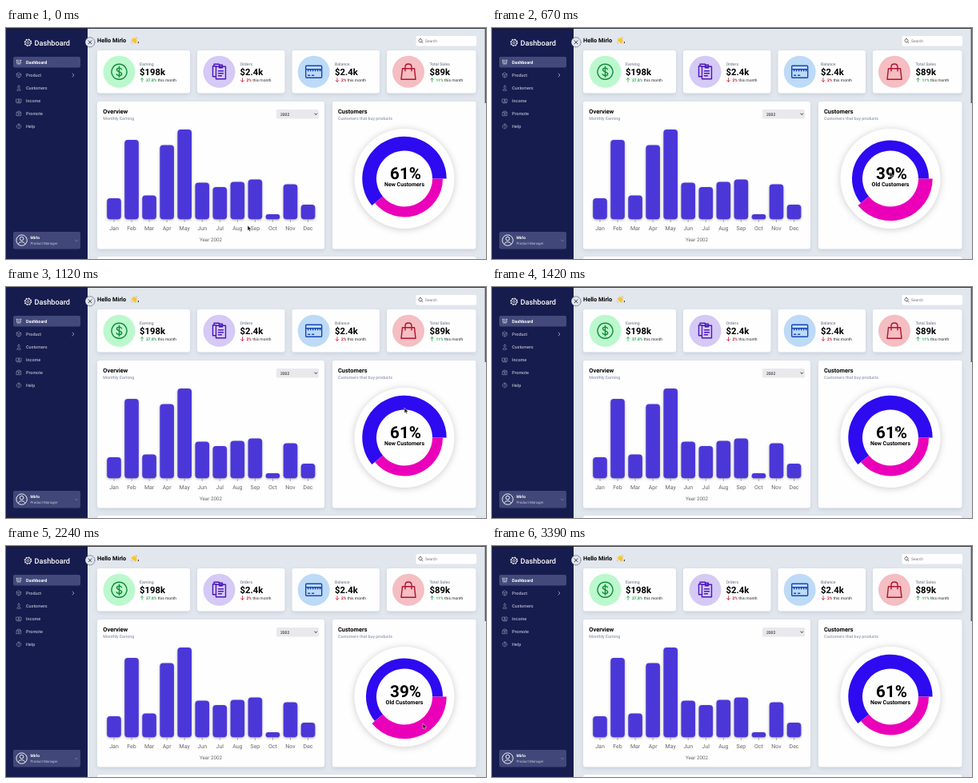
Recreate the animation shown at these times as an HTML page. Size 600 by 289 pixels, loop 3.64 s.

```html
<!DOCTYPE html>
<html lang="en">
<head>
<meta charset="utf-8">
<title>Dashboard</title>
<style>
  html, body { margin: 0; width: 100%; height: 100%; overflow: hidden; background: #e2e7ee; }
  svg { display: block; width: 100vw; height: 100vh; font-family: Roboto, sans-serif; text-rendering: geometricPrecision; }
  .card { fill: #fefefe; filter: drop-shadow(0 2px 2.5px #5666802e); }
  .bar { fill: #4b37d8; filter: drop-shadow(0 1.5px 1.5px #0005); }
  .dial { fill: #fefefe; filter: drop-shadow(0 1px 4px #0003); }
  .line { fill: none; stroke-linecap: round; stroke-linejoin: round; }
</style>
</head>
<body>
<svg id="stage" viewBox="0 0 600 289" preserveAspectRatio="none"></svg>
<script>
const LOOP = 3640;
const stage = document.getElementById('stage');

const text = (x, y, size, fill, content, weight = 400, anchor = 'start') =>
  `<text x="${x}" y="${y}" font-size="${size}" fill="${fill}" font-weight="${weight}" text-anchor="${anchor}">${content}</text>`;
const rect = (x, y, w, h, rx, attrs) =>
  `<rect x="${x}" y="${y}" width="${w}" height="${h}" rx="${rx}" ${attrs}/>`;
const circle = (x, y, r, attrs) => `<circle cx="${x}" cy="${y}" r="${r}" ${attrs}/>`;
const line = (x, y, d, color, width = 0.7) =>
  `<path class="line" transform="translate(${x} ${y})" d="${d}" stroke="${color}" stroke-width="${width}"/>`;
const card = (x, y, w, h) => rect(x, y, w, h, 3, 'class="card"');

function sidebar() {
  const items = [
    ['Dashboard', 'M-3-2.7H3M-2.5-2.7V1.3H2.5V-2.7M-1.5 3L0 1.3 1.5 3M-1.2 0V-1M0 0V-1.6M1.2 0V-.7'],
    ['Product', 'M0-3L2.7-1.5V1.5L0 3-2.7 1.5V-1.5ZM-2.7-1.5L0 0 2.7-1.5M0 0V3'],
    ['Customers', 'M0-2.8A1.3 1.4 0 1 1-.01-2.8ZM-2.2 2.8C-2 .2 2 .2 2.2 2.8Z'],
    ['Income', 'M-3-2H3V1.8H-3ZM0-1A.9.9 0 1 1-.01-1ZM-2.4 2.8H2.4'],
    ['Promote', 'M-2.7-1.2L-1.5-2.8H1.5L2.7-1.2V2.7H-2.7ZM-2.7-1.2H2.7M-1 .8L0-.2 1 .8M0-.2V1.8'],
    ['Help', 'M0-2.8A2.8 2.8 0 1 1-.01-2.8ZM-.8-.8C-.7-1.8 .9-1.7.8-.7 .7-.1 0 0 0 .6M0 1.5V1.5'],
  ];
  const nav = items.map(([label, icon], i) => {
    const y = 43 + 16 * i, color = i ? '#b3b7cd' : '#fff';
    return line(16, y, icon, color, 0.5) + text(25, y + 1.9, 5.45, color, label, i ? 500 : 700);
  }).join('');

  return rect(0, 0, 102, 289, 0, 'fill="#171c4e"')
    + circle(27.5, 18.3, 3.6, 'fill="none" stroke="#fff" stroke-width=".8"')
    + circle(27.5, 18.3, 4.2, 'fill="none" stroke="#fff" stroke-width="1.1" stroke-dasharray="1.65 1.65"')
    + circle(27.5, 18.3, 1.4, 'fill="none" stroke="#fff" stroke-width=".8"')
    + text(35.5, 21.6, 9.2, '#fff', 'Dashboard', 500)
    + rect(9, 36, 84, 13.5, 2, 'fill="#434a7b"') + nav
    + line(84, 59, 'M-1-2L1 0-1 2', '#b3b7cd', 0.8)
    + rect(9, 255, 84, 21.5, 2, 'fill="#414879"')
    + circle(19.6, 265.6, 6.7, 'fill="none" stroke="#fff" stroke-width=".9"')
    + circle(19.6, 263.6, 2.3, 'fill="none" stroke="#fff" stroke-width=".9"')
    + line(19.6, 265.6, 'M-4.3 4.8C-3.4 1 3.4 1 4.3 4.8', '#fff', 0.9)
    + text(30.5, 264.4, 4.9, '#fff', 'Mirlo', 700)
    + text(30.5, 271.2, 4.4, '#c5c8d9', 'Product Manager')
    + line(88, 266, 'M-1.6-.8L0 .8 1.6-.8', '#9196b5', 0.6);
}

function header() {
  return circle(105, 17.8, 6, 'fill="#e2e7ee" stroke="#171c4e" stroke-width=".7" stroke-dasharray="1.2 .6"')
    + line(105, 17.8, 'M-2-2L2 2M2-2L-2 2', '#111', 0.8)
    + text(114, 17.8, 7.35, '#000', 'Hello Mirlo', 700)
    + line(160, 15.5, 'M-1.5-2.2L.5 .5M.3-3L1.6 0M2.4-2L2.6 1M-2.8-.6L-.4 1.6', '#f9c52d', 1.5)
    + line(160.6, 16.6, 'M-1-.8L1.5-.6 1 1.5Z', '#f9c52d', 2.6)
    + line(160, 15.5, 'M-4 2C-3.6 3-3 3.6-2 4M2.5-4.2C3.3-4 3.8-3.4 4-2.6', '#8c8f94', 0.4)
    + text(164.4, 17.8, 7.35, '#000', ',', 700)
    + rect(512.5, 10, 75.5, 12.5, 2, 'fill="#fff"')
    + line(518, 15.8, 'M0-2.2A2.1 2.1 0 1 1-.01-2.2ZM1.5 1.5L3 3', '#333', 0.7)
    + text(524, 18, 4.9, '#777', 'Search');
}

function stats() {
  const cards = [
    { x: 114, w: 116, cx: 141.5, tx: 167, label: 'Earning', value: '$198k', change: '37.8%', up: true,
      tint: '#bcf8cd', ink: '#128a38',
      icon: 'M0-9.5A9.5 9.5 0 1 1-.01-9.5ZM3-3C2-5.3-3-5.2-3-2.5-3 .6 3.2-.6 3.2 2.6 3.2 5.4-2.5 5.4-3.3 2.8M0-6.5V6.5' },
    { x: 239, w: 109.5, cx: 266.5, tx: 292.5, label: 'Orders', value: '$2.4k', change: '2%',
      tint: '#d5c9f5', ink: '#4b18b8',
      icon: 'M-4-7H-8V6H-4M-4-6.5H8V9H-4ZM0-8.5H4V-5H0ZM-1-1H5M-1 2H5M-1 5H3M-6.5-7V-9.5H0' },
    { x: 357.5, w: 109.5, cx: 384.7, tx: 411, label: 'Balance', value: '$2.4k', change: '2%',
      tint: '#bddaf7', ink: '#1747b8',
      icon: 'M-9-7.5H9Q10-7.5 10-6.5V6.5Q10 7.5 9 7.5H-9Q-10 7.5-10 6.5V-6.5Q-10-7.5-9-7.5ZM-10-3H10M-7-3V-1M-4-3V-1M-1-3V-1M2-3V-1M5-3V-1M8-3V-1M-7 4.5H-5M-2 4.5H0' },
    { x: 476, w: 111.5, cx: 503, tx: 529.5, label: 'Total Sales', value: '$89k', change: '11%', up: true,
      tint: '#f4bec2', ink: '#b0142f',
      icon: 'M-7.5-4H7.5L9 9.5H-9ZM-4-1V-6C-4-11 4-11 4-6V-1' },
  ];
  return cards.map(c => {
    const color = c.up ? '#19a94c' : '#c9102b';
    const arrow = c.up ? 'M0 2.3V-2.3M-1.8-.5L0-2.3 1.8-.5' : 'M0-2.3V2.3M-1.8 .5L0 2.3 1.8 .5';
    return card(c.x, 28, c.w, 53.5)
      + circle(c.cx, 54.8, 20, `fill="${c.tint}"`)
      + line(c.cx, 54.8, c.icon, c.ink, 1.4)
      + text(c.tx, 46.6, 5.2, '#7d8798', c.label, 500)
      + text(c.tx, 58.6, 11.3, '#000', c.value, 700)
      + line(c.tx + 3, 65, arrow, color, 0.8)
      + text(c.tx + 8, 66.7, 4.9, '#222', `<tspan fill="${color}" font-weight="700">${c.change}</tspan> this month`);
  }).join('');
}

function overview() {
  const tops = { Jan: 213, Feb: 140, Mar: 209.5, Apr: 146.5, May: 127, Jun: 193.5,
                 Jul: 199, Aug: 192.5, Sep: 189.5, Oct: 233, Nov: 195.5, Dec: 221 };
  const base = 239.3;
  const bars = Object.entries(tops).map(([month, top], i) => {
    const x = 135 + 22.05 * i;
    return rect(x - 8.8, top, 17.6, base - top, Math.min(4, (base - top) / 2), 'class="bar"')
      + line(x, 240, 'M0 0V2.6', '#777', 0.6)
      + text(x, 253.2, 7, '#666', month, 400, 'middle');
  }).join('');
  return card(114, 92, 284, 184.5)
    + text(121.3, 106.5, 7.45, '#000', 'Overview', 700)
    + text(121.3, 114.6, 5.35, '#8f9bb3', 'Monthly Earning', 500)
    + rect(338, 102, 53, 11.5, 1.5, 'fill="#e9e9ed"')
    + text(343, 109.7, 5, '#111', '2002')
    + line(387.3, 107.8, 'M-1.4-.8L0 .8 1.4-.8', '#111', 0.8)
    + bars
    + text(256, 267, 6.3, '#666', 'Year 2002', 400, 'middle');
}

function customers() {
  return card(408, 92, 179.5, 184.5)
    + text(415, 106.5, 7.45, '#000', 'Customers', 700)
    + text(415, 114.6, 5.25, '#8f9bb3', 'Customers that buy products', 500)
    + '<circle class="dial" cx="498" cy="188.5" r="62.5"/>'
    + '<path id="newSlice" fill="#2d0af0"/><path id="oldSlice" fill="#ea00b8"/>'
    + text(499.5, 188.6, 20.6, '#000', '<tspan id="share"></tspan>', 700, 'middle')
    + text(498, 197.6, 7.03, '#000', '<tspan id="group"></tspan>', 700, 'middle');
}

stage.innerHTML = rect(0, 0, 600, 289, 0, 'fill="#e2e7ee"')
  + sidebar() + header() + stats() + overview() + customers()
  + card(114, 286, 473.5, 20)
  + rect(0, 0, 600, 0.9, 0, 'fill="#24252b"')
  + rect(598.6, 0, 1.4, 94, 0, 'fill="#55585f"')
  + '<path id="cursor" d="M0 0V6.6L1.5 5.3 2.5 7.5 3.6 7 2.7 4.9H4.7Z" fill="#161616" stroke="#fff" stroke-width=".45"/>';

// Ring sector between two fractions of a turn, counterclockwise from the right.
function sector(from, to, outer) {
  const inner = 35;
  const point = (f, r) => {
    const a = f * 2 * Math.PI;
    return `${498 + r * Math.cos(a)} ${188.5 - r * Math.sin(a)}`;
  };
  const large = to - from > 0.5 ? 1 : 0;
  return `M${point(from, outer)}A${outer} ${outer} 0 ${large} 0 ${point(to, outer)}`
    + `L${point(to, inner)}A${inner} ${inner} 0 ${large} 1 ${point(from, inner)}Z`;
}

// Pointer path: time, x, y.
const path = [
  [0, 302, 247], [30, 303, 246], [180, 400, 235], [300, 465, 221], [360, 476, 218],
  [550, 492, 193], [670, 497, 180], [900, 500, 165], [1120, 498, 151], [1400, 503, 172],
  [1730, 514, 211], [1880, 520, 221], [2120, 520, 221], [2240, 521, 222], [2520, 521, 222],
  [2640, 519, 190], [2790, 511, 150], [3030, 508, 137], [3060, 507, 125], [3210, 500, 46],
];

function pointerAt(t) {
  const i = path.findIndex(p => p[0] > t);
  if (i < 0) return null;
  const [t0, x0, y0] = path[i - 1], [t1, x1, y1] = path[i];
  const k = (t - t0) / (t1 - t0);
  return [x0 + (x1 - x0) * k, y0 + (y1 - y0) * k];
}

const el = id => document.getElementById(id);
const [newSlice, oldSlice, share, group, cursor] =
  ['newSlice', 'oldSlice', 'share', 'group', 'cursor'].map(el);

function draw(now) {
  const t = now % LOOP;
  const old = (t >= 300 && t < 1050) || (t >= 1790 && t < 2720);
  newSlice.setAttribute('d', sector(0, 0.61, old ? 48 : 52.7));
  oldSlice.setAttribute('d', sector(0.61, 1, old ? 52.7 : 48));
  share.textContent = old ? '39%' : '61%';
  group.textContent = old ? 'Old Customers' : 'New Customers';

  const pointer = pointerAt(t);
  cursor.style.display = pointer ? '' : 'none';
  if (pointer) cursor.setAttribute('transform', `translate(${pointer})`);
}

const start = performance.now();
function tick() {
  draw(performance.now() - start);
  requestAnimationFrame(tick);
}
tick();
</script>
</body>
</html>
```
